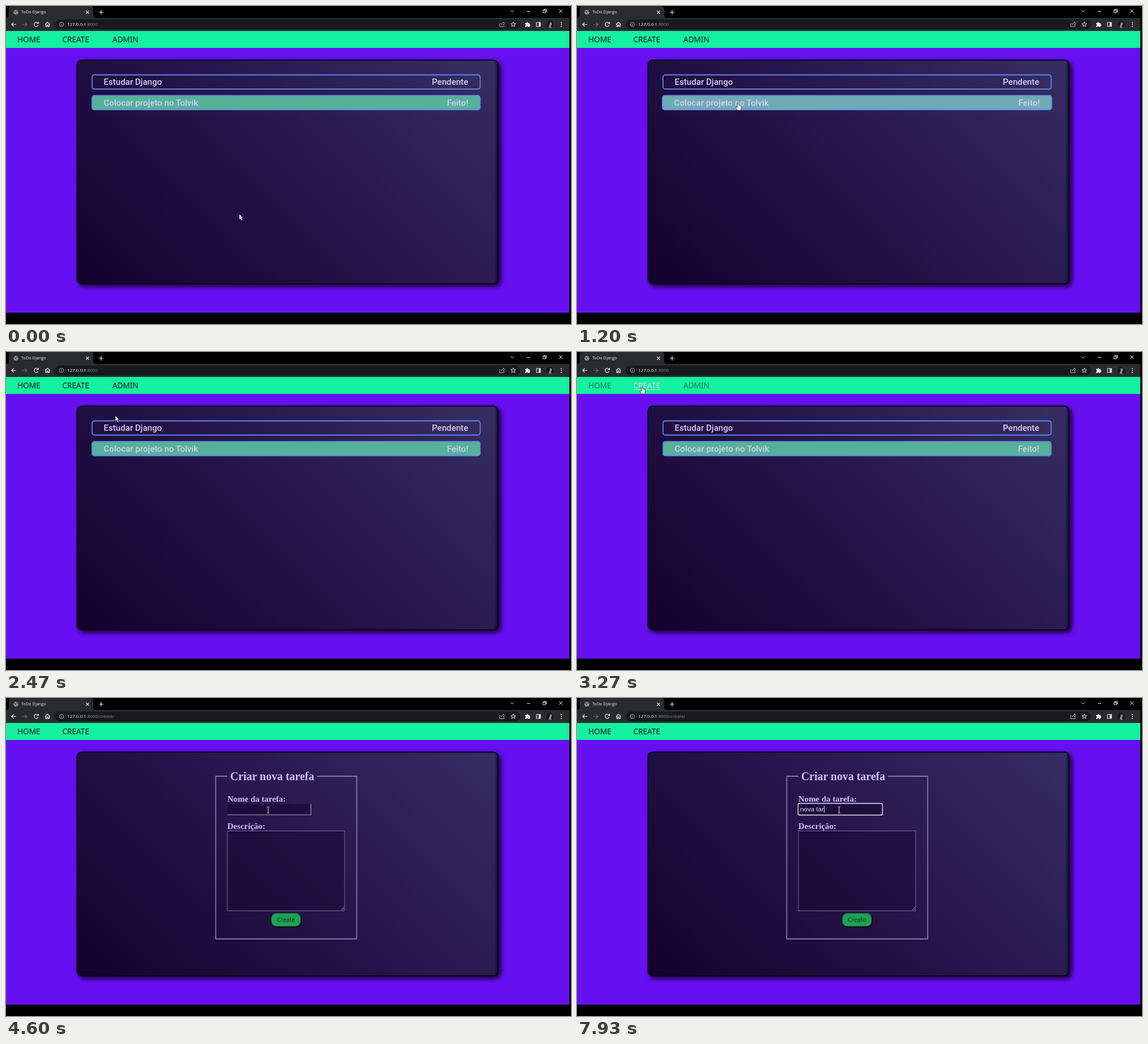
An HTML page that plays this animation: 998 px wide and 561 px high, repeating every 8000 ms.

```html
<!DOCTYPE html>
<html lang="pt">
<head>
<meta charset="utf-8">
<title>ToDo Django</title>
<style>
  html, body { margin: 0; width: 100%; height: 100%; overflow: hidden; background: #000; }
  svg { display: block; width: 998px; height: 561px; }
  .ui { font-family: "Open Sans", "Noto Sans", sans-serif; }
  .nav { font: 500 13.6px "Noto Sans", sans-serif; }
  .row { font: 500 15.1px Roboto, sans-serif; }
  .serif { font: bold 14.9px "Liberation Serif", serif; fill: #cfc0f6; }
  .icon { fill: none; stroke: #e8e8ec; stroke-width: 1.2; }
</style>
</head>
<body>
<svg viewBox="0 0 998 561">
  <defs>
    <linearGradient id="cardFill" gradientUnits="userSpaceOnUse" x1="212" y1="577" x2="782" y2="8">
      <stop offset="0" stop-color="#13002e"/>
      <stop offset=".5" stop-color="#25154a"/>
      <stop offset="1" stop-color="#362e64"/>
    </linearGradient>
    <linearGradient id="edge">
      <stop offset="0" stop-color="#0a0018" stop-opacity=".1"/>
      <stop offset="1" stop-color="#0a0018" stop-opacity=".55"/>
    </linearGradient>
    <filter id="blur" x="-10%" y="-10%" width="120%" height="120%"><feGaussianBlur stdDeviation="4"/></filter>
  </defs>

  <!-- browser window -->
  <rect width="998" height="561" fill="#000"/>
  <path d="M0 21 Q5 21 5 16 V5 Q5 0 10 0 H149 Q154 0 154 5 V16 Q154 21 159 21 H995 V44 H0Z" fill="#2a2b2f"/>
  <rect x="86" y="24" width="822" height="17" rx="8.5" fill="#18191c"/>
  <g class="ui">
    <text x="27" y="13.4" font-size="7.3" fill="#eee">ToDo Django</text>
    <text x="108" y="35.4" font-size="8" fill="#f0f0f0">127.0.0.1<tspan id="path" fill="#8d8f94">:8000</tspan></text>
  </g>
  <circle cx="17.5" cy="11" r="4.3" fill="#96989c"/>
  <path d="M14 9 l3 1 -1 2.500 M18 7.500 l1 2 2 .5 M18 14.500 l1 -2" fill="none" stroke="#2a2b2f"/>
  <g class="icon">
    <path d="M141.500 8.500 l5 5 m0 -5 l-5 5 M164 11 h8 m-4 -4 v8"/>
    <path d="M891 7.500 l3 3 3 -3 M920 9.500 h6 M977 6 l6 6 m0 -6 l-6 6" stroke-width="1"/>
    <path d="M948.500 7.500 h4.500 v4.500 h-4.500z M950 7.500 v-1.500 h4.500 v4.500 h-1.500" stroke-width="1"/>
    <path d="M18 32.500 h-8 m3.500 -3.500 l-3.500 3.500 3.500 3.500"/>
    <path d="M29 32.500 h8 m-3.500 -3.500 l3.500 3.500 -3.500 3.500" stroke="#6b6c70"/>
    <path d="M56.600 30.500 a3.700 3.700 0 1 0 .3 3.200 M57.300 28 v3 h-3"/>
    <path d="M69 32.500 l4.300 -4 4.300 4 M70.300 32 v4.500 h2 v-3 h2 v3 h2 v-4.500"/>
    <g stroke="#a5a6aa" stroke-width="1">
      <circle cx="98" cy="32.500" r="3.800"/>
      <path d="M98 32 v2.600 M98 30.200 v1"/>
      <path d="M873.500 31 h-1.500 v5.500 h8 v-2 M874.500 34 q.5 -4 4 -4 v-2 l3 3 -3 3 v-2"/>
    </g>
    <path d="M896 28 l1.200 3 3.200 .2 -2.500 2 .9 3.200 -2.800 -1.800 -2.800 1.800 .9 -3.200 -2.500 -2 3.200 -.2z" stroke-width=".9"/>
    <path d="M937 29 h7 v7 h-7z"/>
    <path d="M942.500 29 v7" stroke-width="3"/>
  </g>
  <g fill="#eee">
    <path d="M917 30 h2.300 a1.500 1.500 0 0 1 3 0 h2.400 v2.300 a1.500 1.500 0 0 1 0 3 v1.700 h-2.600 a1.300 1.300 0 0 0 -2.600 0 h-2.500 v-2.500 a1.300 1.300 0 0 0 0 -2.600z"/>
    <circle cx="981" cy="29.300" r="1"/><circle cx="981" cy="32.600" r="1"/><circle cx="981" cy="35.900" r="1"/>
  </g>
  <circle cx="961" cy="32.500" r="6.500" fill="#17171a"/>
  <path d="M961 29 q3 -1 3.500 2 q0 3 -2 3.500 l1 4 q-3 1 -5 -1z" fill="#8b8b8e"/>

  <!-- page -->
  <rect y="44" width="995" height="497" fill="#6610f2"/>
  <rect y="44" width="995" height="30" fill="#14f1a0"/>
  <g class="nav">
    <text id="home" x="20" y="64">HOME</text>
    <text id="create" x="99.500" y="64">CREATE</text>
    <path id="underline" d="M100 66.500 H148" stroke="#d9d2f5" stroke-width="1.200"/>
    <text id="admin" x="188" y="64">ADMIN</text>
  </g>
  <rect x="129" y="99" width="745" height="396" rx="9" fill="#08001a" opacity=".95" filter="url(#blur)"/>
  <rect x="125.500" y="95.500" width="743.500" height="394.500" rx="8" fill="url(#cardFill)" stroke="#0c0219" stroke-width="2"/>
  <rect x="863" y="99" width="5" height="388" fill="url(#edge)"/>

  <g id="list"></g>

  <g id="form">
    <path d="M391 138 H370.500 V425 H619.500 V138 H549" fill="none" stroke="#a294cc" stroke-width="1.300"/>
    <g class="serif">
      <text x="396" y="145" style="font-size:19.9px">Criar nova tarefa</text>
      <text x="391" y="183">Nome da tarefa:</text>
      <text x="391" y="231">Descrição:</text>
    </g>
    <rect x="391" y="187" width="148" height="19" fill="#1c0938" opacity=".75"/>
    <path id="inset" d="M391 206 H538.500 V187" fill="none" stroke="#a69dbd" stroke-width="1.200"/>
    <rect id="focus" x="390.500" y="186" width="149" height="20.500" rx="2" fill="none" stroke="#e6e2f6" stroke-width="1.400"/>
    <text id="typed" x="394" y="200" font-size="11.700" font-family="'Liberation Sans', sans-serif" fill="#d9d2f2"></text>
    <rect id="caret" y="190" width="1" height="12" fill="#eee"/>
    <rect x="391" y="234.500" width="207" height="141" fill="#1c0938" fill-opacity=".6" stroke="#776b98"/>
    <path d="M592 374 l5 -5 m-2 5 l2 -2" stroke="#b5afc6" stroke-width=".9"/>
    <rect x="469" y="381" width="53" height="24" rx="9" fill="#0b0218"/>
    <rect x="468.500" y="379.500" width="52" height="23.500" rx="9" fill="#20a052" stroke="#123c37"/>
    <text x="494.500" y="395" text-anchor="middle" font-size="11" font-family="Roboto, sans-serif" fill="#12382d">Create</text>
  </g>

  <g id="pointer">
    <path id="arrow" d="M0 0 V10 L2.300 8 L4 11.800 L5.600 11 L4 7.300 L7 7.100Z" fill="#fff" stroke="#16111f" stroke-width=".6"/>
    <path id="hand" d="M-1 1 Q0 -.6 1.100 1 V5 Q2.200 4.200 2.800 5.400 Q4 4.600 4.600 5.900 Q6.200 5.500 6.200 7 V10 Q6 12 5 14 H-.6 Q-1.500 12 -3.500 9.400 Q-4 7.600 -2.300 8.100 L-1 9.200Z" fill="#fff" stroke="#1c1626" stroke-width=".7"/>
    <path id="beam" d="M-2 -5.500 H-.5 L0 -5 L.5 -5.500 H2 M0 -5 V5 M-2 5.500 H-.5 L0 5 L.5 5.500 H2" fill="none" stroke="#e3e0ea"/>
  </g>
</svg>
<script>
const LOOP = 8000, STEP = 1000 / 15;
const PAGE_LOAD = 3730, FOCUS = 4660, BLINK = 530;
const NAV_HOVER = [3060, 3800];

const ROWS = [
  { y: 134, task: 'Estudar Django', state: 'Pendente', fill: 'none', glow: '#584f88', hover: [1410, 2320] },
  { y: 170.5, task: 'Colocar projeto no Tolvik', state: 'Feito!', fill: '#55b299', glow: '#70abb5', hover: [690, 1320] },
];

// time, x, y
const ROUTE = [
  [0, 412, 367], [60, 412, 367], [300, 375, 298], [600, 300, 196], [800, 283.5, 178],
  [930, 282, 176], [1200, 284, 170], [1400, 287, 149], [1600, 289, 141.5], [1730, 287, 139],
  [2000, 272, 136], [2220, 272, 136], [2467, 193, 112], [2800, 128, 78], [3070, 115, 62],
  [3267, 114.5, 60], [3700, 114.5, 60], [3870, 180, 92], [4200, 400, 178], [4470, 463, 197.5],
  [LOOP, 463, 197.5],
];

// time at which each character of the task name is typed
const PHRASE = 'nova tar';
const KEYS = [5720, 5860, 5990, 6125, 6995, 7460, 7725, 7925];

const $ = id => document.getElementById(id);
const show = (id, on) => $(id).setAttribute('visibility', on ? 'inherit' : 'hidden');
const clamp = v => Math.max(0, Math.min(1, v));
const between = (v, a, b) => v >= a && v <= b;
const fade = (t, [start, end], span = 130) => clamp((t - start) / span) * (1 - clamp((t - end) / span));
const mix = (a, b, k) => `rgb(${a.map((v, i) => Math.round(v + (b[i] - v) * k))})`;

$('list').innerHTML = ROWS.map(({ task, state, fill, glow }) => {
  const box = 'x="-343" y="-12.5" width="685.5" height="25" rx="4"';
  return `<g class="row" fill="#d8cbf5">
    <rect ${box} fill="${fill}"/>
    <rect class="glow" ${box} fill="${glow}"/>
    <rect ${box} fill="none" stroke="#6384e2" stroke-width="1.8"/>
    <text x="-322.5" y="5.2">${task}</text>
    <text x="321.5" y="5.2" text-anchor="end">${state}</text>
  </g>`;
}).join('');

function pointerAt(t) {
  const i = ROUTE.findIndex(p => p[0] > t);
  const [t0, x0, y0] = ROUTE[i - 1], [t1, x1, y1] = ROUTE[i];
  const k = (t - t0) / (t1 - t0);
  return [x0 + (x1 - x0) * k, y0 + (y1 - y0) * k];
}

function drawNav(t, onForm) {
  const k = fade(t, NAV_HOVER);
  const dimmed = mix([8, 20, 20], [22, 118, 86], k);
  $('home').setAttribute('fill', dimmed);
  $('admin').setAttribute('fill', dimmed);
  $('create').setAttribute('fill', mix([8, 20, 20], [217, 210, 245], k));
  show('underline', k > 0.5);
  show('admin', !onForm);
  $('path').textContent = onForm ? ':8000/create/' : ':8000';
}

function drawRows(t) {
  ROWS.forEach(({ y, hover }, i) => {
    const k = fade(t, hover), row = $('list').children[i];
    row.setAttribute('transform', `translate(495 ${y}) scale(${1 + 0.003 * k})`);
    row.querySelector('.glow').setAttribute('opacity', k);
  });
}

function drawInput(t) {
  const count = KEYS.filter(key => key <= t).length;
  const focused = t >= FOCUS;
  const lastEvent = count ? KEYS[count - 1] : FOCUS - 70;
  $('typed').textContent = PHRASE.slice(0, count).replace(/ /g, '\u00a0');
  $('caret').setAttribute('x', 394 + $('typed').getComputedTextLength());
  show('caret', focused && Math.floor((t - lastEvent) / BLINK) % 2 === 0);
  show('focus', focused);
  show('inset', !focused);
}

function drawPointer(t, onForm) {
  const [x, y] = pointerAt(t);
  const overLink = between(x, 99, 149) && between(y, 50, 70);
  const overRow = !onForm && between(x, 151, 838) && ROWS.some(r => Math.abs(y - r.y) < 13.5);
  const overInput = onForm && between(x, 391, 539) && between(y, 187, 206);
  const kind = overLink || overRow ? 'hand' : overInput ? 'beam' : 'arrow';
  ['arrow', 'hand', 'beam'].forEach(id => show(id, id === kind));
  $('pointer').setAttribute('transform', `translate(${x} ${y})`);
}

function draw(time) {
  const t = Math.floor((time % LOOP + 4) / STEP) * STEP % LOOP;
  const onForm = t >= PAGE_LOAD;
  show('list', !onForm);
  show('form', onForm);
  drawNav(t, onForm);
  drawRows(t);
  if (onForm) drawInput(t);
  drawPointer(t, onForm);
}

const start = performance.now();
function tick() {
  draw(performance.now() - start);
  requestAnimationFrame(tick);
}
tick();
</script>
</body>
</html>
```
